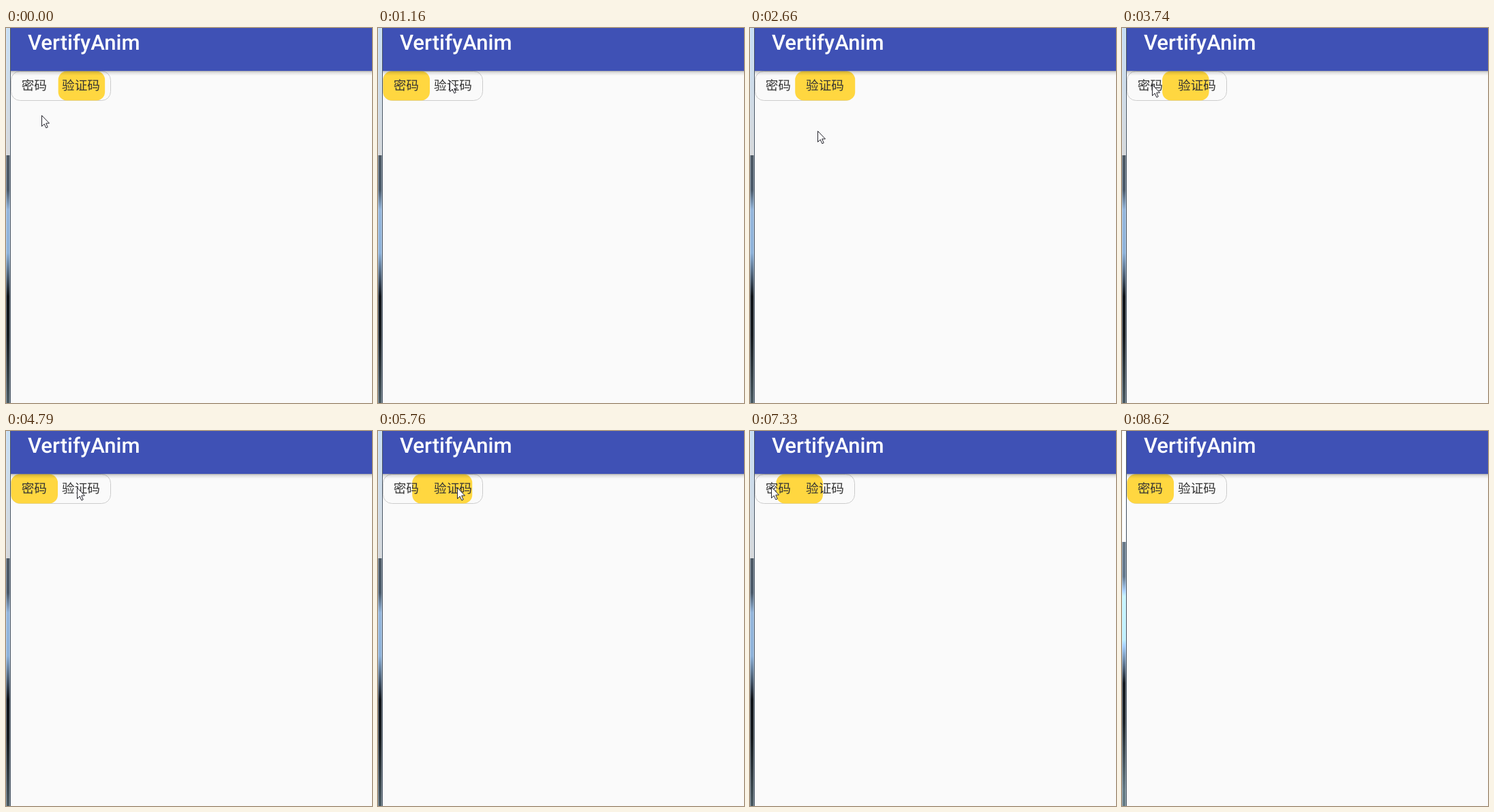
Recreate the animation shown at these times as an HTML page. Size 537 by 551 pixels, loop 8670 ms.

```html
<!DOCTYPE html>
<html lang="zh">
<head>
<meta charset="utf-8">
<title>VertifyAnim</title>
<style>
  html, body { margin: 0; width: 100%; height: 100%; overflow: hidden; background: #fafafa; }
  svg { display: block; }
  text { text-rendering: geometricPrecision; }
  .title { font: 500 31.1px Roboto, sans-serif; fill: #fff; }
  .label { font: 18.67px "Noto Sans CJK SC", "Noto Sans CJK", sans-serif; fill: #333; }
  .shifted { transform: translateY(-24px); filter: brightness(1.35); }
</style>
</head>
<body>
<svg width="537" height="551" viewBox="0 0 537 551">
  <defs>
    <linearGradient id="shadow" x2="0" y2="1">
      <stop stop-color="#000" stop-opacity=".3"/>
      <stop offset=".35" stop-color="#000" stop-opacity=".11"/>
      <stop offset="1" stop-color="#000" stop-opacity="0"/>
    </linearGradient>
    <linearGradient id="desktop" x2="0" y2="1">
      <stop stop-color="#c6def5"/>
      <stop offset=".322" stop-color="#d6d8da"/>
      <stop offset=".322" stop-color="#4c5863"/>
      <stop offset=".41" stop-color="#485868"/>
      <stop offset=".46" stop-color="#94b6dc"/>
      <stop offset=".57" stop-color="#8db2da"/>
      <stop offset=".68" stop-color="#0d1116"/>
      <stop offset=".78" stop-color="#14191d"/>
      <stop offset=".95" stop-color="#4a5a62"/>
    </linearGradient>
  </defs>
  <rect width="537" height="551" fill="#fafafa"/>
  <rect id="desktopEdge" width="6" height="580" fill="url(#desktop)"/>
  <path d="M.5 0V551M5.5 0V551" stroke="#e4eef8" stroke-opacity=".5"/>
  <path d="M6.5 0V551" stroke="#465260"/>
  <rect x="7" width="530" height="63" fill="#3f51b5"/>
  <text class="title" x="31.9" y="32">VertifyAnim</text>
  <rect x="7.5" y="63.5" width="146" height="43" rx="13" fill="none" stroke="#ccc"/>
  <rect id="pill" y="63.5" height="43" rx="12.4" fill="#ffd740"/>
  <rect x="7" y="63" width="530" height="7" fill="url(#shadow)"/>
  <text class="label" x="22.7" y="91.4">密码</text>
  <text class="label" x="82" y="91.4">验证码</text>
  <path id="cursor" d="M.5 .5V16.5L4.2 13L6.8 18.8L9.2 17.8L6.7 12H11.5Z" fill="#fff" stroke="#24242c"/>
</svg>
<script>
const [desktopEdge, pill, cursor] =
  ['desktopEdge', 'pill', 'cursor'].map(id => document.getElementById(id));

const LOOP = 8670, SLIDE = 1000, TRAVEL = 450;
const POINTER_GONE = 7940, DESKTOP_SHIFT = 8620;
const LEFT = 7.5, RIGHT = 154.2;

// Each tap toggles the switch, starting towards the left
const taps = [-220, 1595, 3345, 5110, 6764];
const pillWidth = [68.5, 88];

// The pointer reaches each stop after an eased move of TRAVEL ms
const stops = [
  { at: 0, x: 52, y: 128 },
  { at: 1160, x: 105, y: 77 },
  { at: 2210, x: 50, y: 198 },
  { at: 2660, x: 99, y: 151 },
  { at: 3160, x: 44, y: 83 },
  { at: 4910, x: 116, y: 83 },
  { at: 6640, x: 31, y: 82 },
  { at: 7790, x: 281, y: 468 }
];

const ease = p => (1 - Math.cos(Math.PI * Math.max(0, Math.min(p, 1)))) / 2;
const mix = (a, b, p) => a + (b - a) * p;

function drawPill(t) {
  const index = taps.findLastIndex(tap => tap <= t);
  const toRight = index % 2;
  const width = pillWidth[toRight];
  const p = ease((t - taps[index]) / SLIDE);
  const farEnd = RIGHT - width;
  pill.setAttribute('x', toRight ? mix(LEFT, farEnd, p) : mix(farEnd, LEFT, p));
  pill.setAttribute('width', width);
}

function drawPointer(t) {
  const { x, y } = stops.reduce((from, to) => {
    const p = ease((t - to.at) / TRAVEL + 1);
    return { x: mix(from.x, to.x, p), y: mix(from.y, to.y, p) };
  });
  cursor.setAttribute('transform', `translate(${Math.round(x)} ${Math.round(y)})`);
  cursor.setAttribute('visibility', t < POINTER_GONE ? 'visible' : 'hidden');
}

const origin = performance.now();
function frame() {
  const t = (performance.now() - origin) % LOOP;
  drawPill(t);
  drawPointer(t);
  desktopEdge.classList.toggle('shifted', t >= DESKTOP_SHIFT);
  requestAnimationFrame(frame);
}
frame();
</script>
</body>
</html>
```
